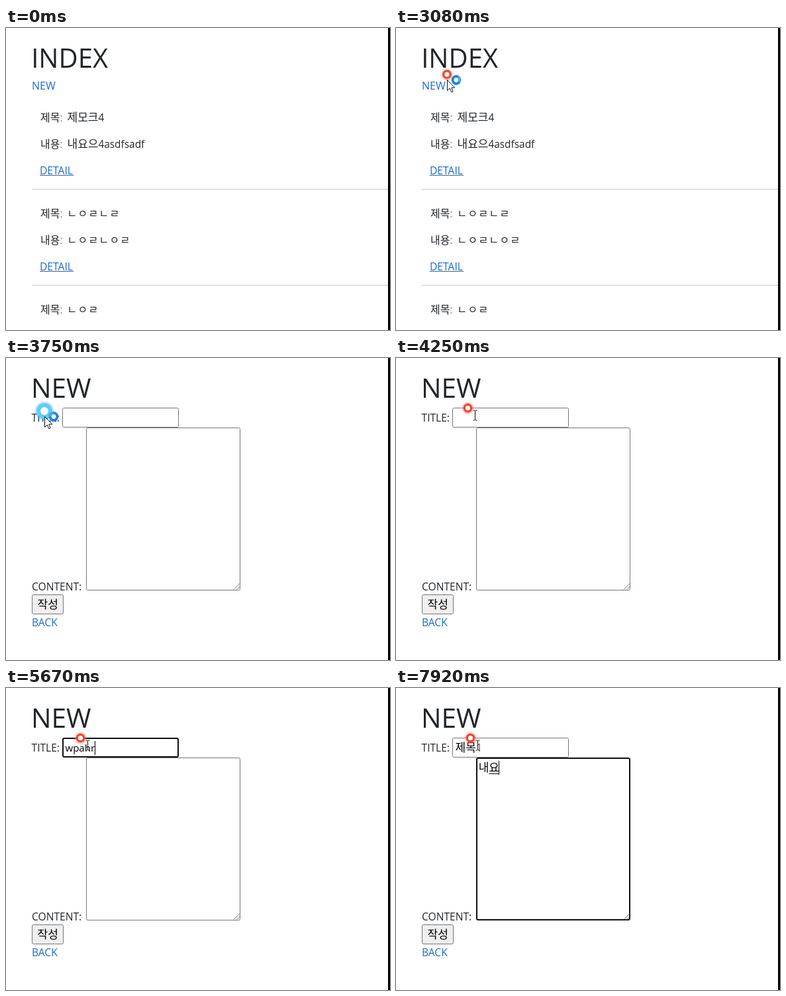
Write an HTML page that moves like this. It is 580 px wide and 456 px high and loops after 8000 ms.

```html
<!DOCTYPE html>
<html lang="ko">
<head>
<meta charset="utf-8">
<title>Index and new post</title>
<style>
  html, body { margin: 0; width: 100%; height: 100%; overflow: hidden; background: #fff; }
  svg { display: block; width: 580px; height: 456px; }
  text { font: 16px "Open Sans", "Noto Sans CJK KR", "Noto Sans CJK", sans-serif; fill: #212529; white-space: pre; }
  .h1 { font-size: 40px; }
  .link { fill: #186bd0; }
  .small { font-size: 15.6px; }
  .value { font-size: 15.4px; }
  .label, .ko, .jamo { font-weight: 350; }
  .ko { font-size: 17px; }
  .jamo { font-size: 16px; letter-spacing: .08em; }
  .item { font-size: 13.33px; fill: #111; }
  .hangul { font-size: 17px; font-weight: 350; fill: #000; }
  .latin { font-size: 15px; fill: #000; }
  .field { fill: #fff; stroke: #767676; }
  .focus { fill: #fff; stroke: #101010; stroke-width: 2; }
  .menu { fill: #fff; filter: drop-shadow(0 1px 1.5px rgba(0,0,0,.42)); }
</style>
</head>
<body>
<svg viewBox="0 0 580 456">
  <defs>
    <filter id="glow" x="-60%" y="-60%" width="220%" height="220%"><feGaussianBlur stdDeviation="1.6"/></filter>
  </defs>
  <rect width="580" height="456" fill="#fff"/>

  <g id="index">
    <text class="h1" x="38.2" y="60">INDEX</text>
    <text class="link" x="39" y="93">NEW</text>
    <g id="posts"></g>
  </g>

  <g id="form">
    <text class="h1" x="38" y="60" style="font-size:40.5px">NEW</text>
    <text class="small" x="38.5" y="96">TITLE:</text>
    <text class="small" x="39" y="351">CONTENT:</text>
    <rect class="field" x="39.5" y="357.5" width="47" height="29" rx="2" style="fill:#efefef"/>
    <text class="hangul" x="47.5" y="378">작성</text>
    <text class="link small" x="39" y="405">BACK</text>
    <rect id="title" rx="2"/>
    <text id="titleText" x="89.5" y="96"></text>
    <rect id="content" rx="2"/>
    <path d="M344 349.5l9-9M349 349.5l4-4" stroke="#666" fill="none"/>
    <text id="contentText" class="hangul" x="124.7" y="126"></text>
    <path id="compose" stroke="#111" fill="none"/>
    <path id="caret" stroke="#000" fill="none"/>
    <g id="menu">
      <rect id="menuBox" class="menu" x="85" y="106" width="192" rx="1"/>
      <g id="items"></g>
    </g>
  </g>

  <g id="pointer">
    <g id="red">
      <circle r="6" fill="none" stroke="#ff7a68" stroke-width="4" opacity=".75" filter="url(#glow)"/>
      <circle r="5.2" fill="#fff" stroke="#ef4633" stroke-width="3.2"/>
    </g>
    <g id="cyan">
      <circle r="10" fill="none" stroke="#3cc0ff" stroke-width="6" opacity=".8" filter="url(#glow)"/>
      <circle r="8.5" fill="#fff" stroke="#62cbf8" stroke-width="5"/>
    </g>
    <g id="arrow">
      <path d="M.5 .5V16.5L4.2 13L6.8 18.8L9.2 17.8L6.7 12.1H11.8Z" fill="#fff" stroke="#111"/>
      <g id="busy">
        <circle cx="14" cy=".5" r="5.4" fill="#fff" stroke="#1c83e2" stroke-width="4"/>
        <path id="spin" d="M14 -4.9A5.4 5.4 0 0 1 19.4 .5" fill="none" stroke="#54aaf2" stroke-width="2.5"/>
      </g>
    </g>
    <path id="beam" d="M-3 -7.5H-1L0 -6.5L1 -7.5H3M0 -6.5V6.5M-3 7.5H-1L0 6.5L1 7.5H3" fill="none" stroke="#111"/>
  </g>

  <rect x="577" width="3" height="456" fill="#000"/>
</svg>
<script>
const LOOP = 8000, STEP = 1000 / 12;
const $ = id => document.getElementById(id);
const show = (id, on) => $(id).setAttribute('display', on ? 'inline' : 'none');
const move = (id, x, y) => $(id).setAttribute('transform', `translate(${x} ${y})`);
const within = (t, a, b) => t >= a && t < b;
const text = (x, y, s, cls = '') => `<text class="${cls}" x="${x}" y="${y}">${s}</text>`;

// index page: syllables are set a little larger than Latin letters
const mixed = s => s.replace(/[가-힣]+/g, '<tspan class="ko">$&</tspan>')
  .replace(/[ㄱ-ㅎ]+/g, '<tspan class="jamo">$&</tspan>');
const line = (y, label, s) => text(52, y, label + ':', 'label') + text(92.5, y, mixed(s), 'value');
const post = (y, title, body) => line(y, '제목', title) + line(y + 40, '내용', body) +
  text(51, y + 80, 'DETAIL', 'link small') +
  `<path d="M51 ${y + 81.5}h51" stroke="#186bd0"/><path d="M39 ${y + 102.5}H577" stroke="#c6c6c6"/>`;
$('posts').innerHTML = post(141, '제모크4', '내요으4asdfsadf') +
  post(286, 'ㄴㅇㄹㄴㄹ', 'ㄴㅇㄹㄴㅇㄹ') + line(431, '제목', 'ㄴㅇㄹ');

const history = ['ㅇㄴㄹㄴ', '제목1', 'ㄴㅇㄹ', 'ㄴㅇㄹㄴㅇ', 'ㄴㅇㄹㄴㄹ', 'ㄴㅇㄹㄴㅁㅇㄹ'];

// typed values by time
const titleKeys = [[0, ''], [4920, 'w'], [5000, 'wp'], [5080, 'wpa'], [5250, 'wpah'], [5420, 'wpahr'],
  [5750, 'wpah'], [5830, 'wpa'], [5920, 'wp'], [6000, 'w'], [6080, ''],
  [6330, 'ㅈ'], [6420, '제'], [6500, '젬'], [6580, '제모'], [6750, '제목'], [7000, '제목1']];
const contentKeys = [[0, ''], [7670, 'ㄴ'], [7750, '내'], [7830, '냉'], [7920, '내요']];
const valueAt = (keys, t) => keys.filter(k => k[0] <= t).pop()[1];

// pointer path: time, x, y
const path = [[2170, 150, -18], [2500, 118, 30], [2920, 77, 78], [3083, 77, 78], [3420, 58, 88],
  [3830, 58, 88], [4330, 123.5, 86.5]];
const ease = u => u * u * (3 - 2 * u);
function pointAt(t) {
  const i = path.findIndex(p => p[0] > t);
  if (i < 0) return path[path.length - 1].slice(1);
  if (i === 0) return path[0].slice(1);
  const [a, b] = [path[i - 1], path[i]], u = ease((t - a[0]) / (b[0] - a[0]));
  return [a[1] + (b[1] - a[1]) * u, a[2] + (b[2] - a[2]) * u];
}

function setBox(id, x, y, w, h, focused) {
  const o = focused ? 1 : .5, el = $(id);
  el.setAttribute('class', focused ? 'focus' : 'field');
  Object.entries({ x: x + o, y: y + o, width: w - 2 * o, height: h - 2 * o })
    .forEach(([k, v]) => el.setAttribute(k, v));
}

function setMenu(rows) {
  show('menu', rows.length > 0);
  $('menuBox').setAttribute('height', rows.length * 36 + 16);
  $('items').innerHTML = rows.map((s, i) =>
    text(98, 137 + i * 36, s, /^[ㄱ-ㅎ]/.test(s) ? 'jamo item' : 'item')).join('');
}

function drawForm(t) {
  const inTitle = within(t, 4420, 7420), inContent = t >= 7420;
  const title = valueAt(titleKeys, t), content = valueAt(contentKeys, t);
  setBox('title', 85, 75, 176, 30, inTitle);
  setBox('content', 121, 105, 233, 246, inContent);
  $('titleText').setAttribute('class', /[a-z]/.test(title) ? 'latin' : 'hangul');
  $('titleText').textContent = title;
  $('contentText').textContent = content;

  const el = $(inContent ? 'contentText' : 'titleText');
  const value = inContent ? content : title;
  const x0 = +el.getAttribute('x'), y = +el.getAttribute('y');
  const end = x0 + (value ? el.getComputedTextLength() : 0);
  show('caret', inTitle || inContent);
  $('caret').setAttribute('d', `M${Math.floor(end) + .5} ${y - 16}v21`);

  const composing = /[ㄱ-ㅎ가-힣]$/.test(value);
  show('compose', composing);
  if (composing) {
    const w = el.getSubStringLength(value.length - 1, 1);
    $('compose').setAttribute('d', `M${end - w} ${y + 3.5}h${w}`);
  }
  setMenu(within(t, 4580, 4920) ? history : within(t, 6420, 7170) ? ['제목1'] : []);
}

function drawPointer(t) {
  show('pointer', t >= 2170);
  const [x, y] = pointAt(t), beam = t >= 4160;
  const click = within(t, 3500, 3900) || within(t, 4420, 4580);
  const rx = beam ? x - 11 : x, ry = beam ? y - 11 : y - 8;
  show('red', !click);
  show('cyan', click);
  move('red', rx, ry);
  move('cyan', rx, ry);
  show('arrow', !beam);
  move('arrow', x, y);
  show('busy', within(t, 2920, 3900));
  $('spin').setAttribute('transform', `rotate(${t * .36 % 360} 14 .5)`);
  show('beam', beam);
  move('beam', x, y);
}

function draw(ms) {
  const t = Math.floor((ms + 5) / STEP) * STEP + 5;
  const form = t >= 3580;
  show('index', !form);
  show('form', form);
  if (form) drawForm(t);
  drawPointer(t);
}

const start = performance.now();
function tick() {
  draw((performance.now() - start) % LOOP);
  requestAnimationFrame(tick);
}
tick();
</script>
</body>
</html>
```
